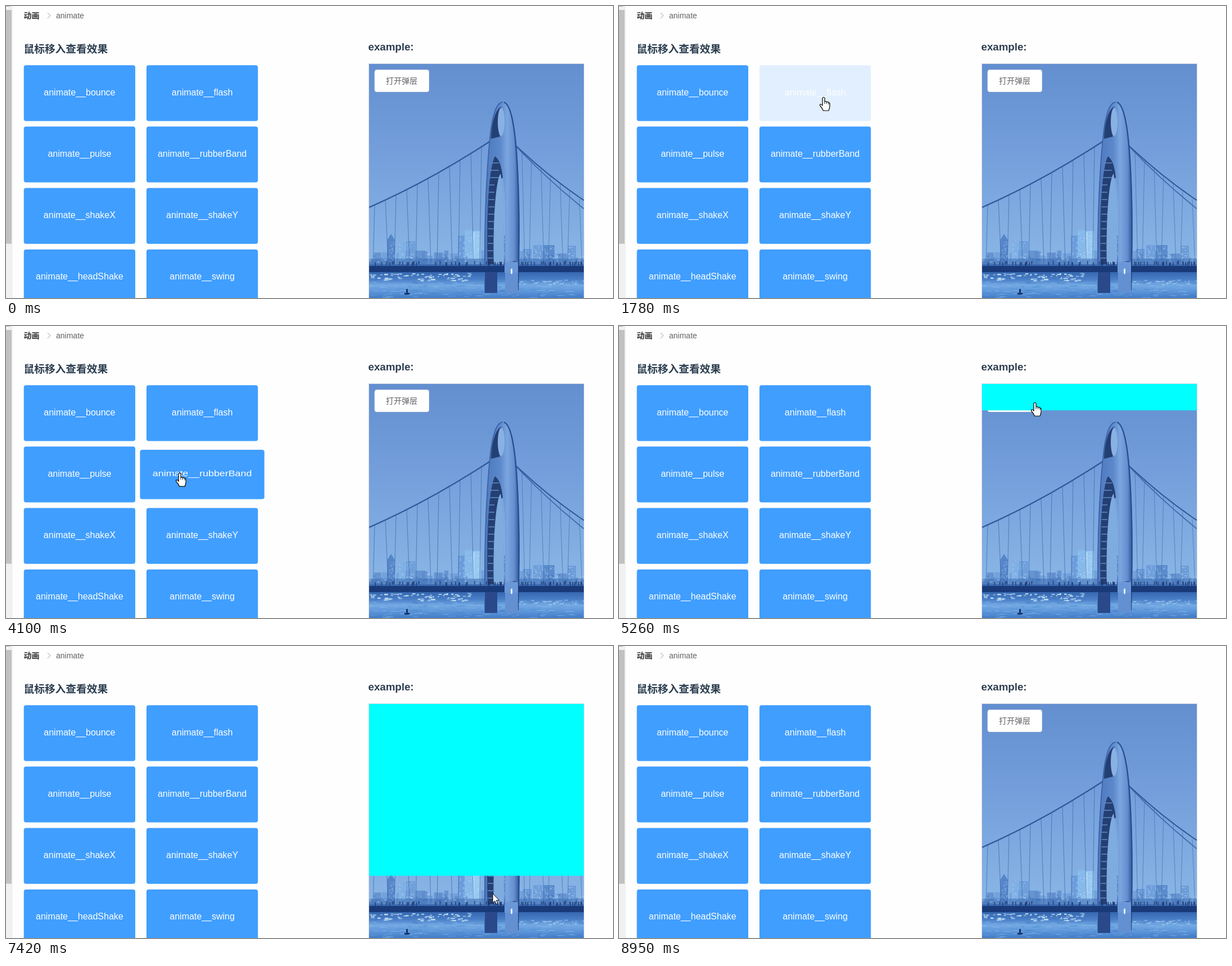
Animation of 1080x519 px, one loop 9960 ms. Source, as an HTML page:

```html
<!DOCTYPE html>
<html lang="zh">
<head>
<meta charset="utf-8">
<title>animate</title>
<style>
html, body { margin: 0; width: 100%; height: 100%; overflow: hidden; background: #fefefe; }
svg { display: block; width: 100vw; height: 100vh; }
text { font-family: "Liberation Sans", Arial, "Noto Sans CJK SC", "Noto Sans CJK", sans-serif; }
</style>
</head>
<body>
<svg id="stage" viewBox="0 0 1080 519">
  <defs>
    <linearGradient id="sky" x2="0" y2="1">
      <stop offset="0" stop-color="#638fd0"/>
      <stop offset=".45" stop-color="#749fdb"/>
      <stop offset="1" stop-color="#8ab6e6"/>
    </linearGradient>
    <linearGradient id="leg">
      <stop offset="0" stop-color="#4c78bd"/>
      <stop offset=".45" stop-color="#5c88cb"/>
      <stop offset=".65" stop-color="#7aa5de"/>
      <stop offset=".85" stop-color="#6590d0"/>
      <stop offset="1" stop-color="#2d559b"/>
    </linearGradient>
    <linearGradient id="water" x2="0" y2="1">
      <stop offset="0" stop-color="#3465ad"/>
      <stop offset=".3" stop-color="#4a80c8"/>
      <stop offset=".5" stop-color="#73a9e3"/>
      <stop offset=".72" stop-color="#5e97da"/>
      <stop offset="1" stop-color="#3f7ac6"/>
    </linearGradient>
    <clipPath id="frame"><rect x="646" y="103" width="382" height="416"/></clipPath>
  </defs>
  <rect width="1080" height="519" fill="#fefefe"/>
  <rect width="12" height="519" fill="#f1f1f1"/>
  <rect y="7" width="10" height="415.500" fill="#c1c1c1"/>
  <rect width="7" height="1" fill="#d9a28c"/>
  <text x="31.500" y="22" font-size="14" font-weight="700" fill="#303133">动画</text>
  <path d="M74 12l5 5l-5 5" fill="none" stroke="#c0c4cc" stroke-width="1.200"/>
  <text x="89" y="22" font-size="14" fill="#606266">animate</text>
  <g font-size="18.720" font-weight="700" fill="#2c3e50">
    <text x="31.500" y="82.500">鼠标移入查看效果</text>
    <text x="644.500" y="79">example:</text>
  </g>
  <g id="cards"></g>
  <rect x="645.500" y="102.500" width="383" height="430" fill="none" stroke="#d5dae4"/>
  <g clip-path="url(#frame)">
    <g id="photo"></g>
    <rect x="656" y="113.500" width="96.500" height="39" rx="3.500" fill="#fff" stroke="#dcdfe6"/>
    <text x="704" y="138" font-size="14" text-anchor="middle" fill="#606266">打开弹层</text>
    <rect id="layer" x="646" y="103" width="382" fill="#0ff"/>
    <g id="note">
      <text x="796.500" y="384" font-size="16" fill="#2c3e50">我是弹层</text>
      <circle cx="868.500" cy="378" r="6.800" fill="#2c3e50"/>
      <path d="M866 375.500l5 5m0-5l-5 5" stroke="#0ff" stroke-width="1.300"/>
    </g>
  </g>
  <g id="pointer" fill="#fff" stroke="#000" stroke-linejoin="round">
    <g id="hand">
      <path d="M-2 1.500Q0-1 2 1.500V8Q4 6.500 5.500 8.700Q8 7.500 9 10Q11 9.500 11 12V17Q10.500 20 9 24H-.5Q-2 20-6 15.500Q-7.500 13-5.500 12.500Q-3.500 12.500-2 15Z" stroke-width="1.200"/>
      <path d="M2 8V12M5.500 8.700V12M9 10V13" fill="none" stroke-width=".9"/>
    </g>
    <path id="arrow" d="M0 0V16.500L3.800 13L6.400 19L9 17.800L6.500 12H11.500Z"/>
  </g>
</svg>
<script>
const LOOP = 9960, STEP = 77.45, FIRST = 530;
const $ = id => document.getElementById(id);
const clamp = v => Math.max(0, Math.min(1, v));
const lerp = (a, b, k) => a + (b - a) * k;

function bezier(x1, y1, x2, y2) {
  const at = (a, b, u) => 3 * u * (1 - u) ** 2 * a + 3 * u * u * (1 - u) * b + u ** 3;
  return x => {
    let lo = 0, hi = 1;
    for (let i = 0; i < 24; i++) {
      const mid = (lo + hi) / 2;
      if (at(x1, x2, mid) < x) lo = mid; else hi = mid;
    }
    return at(y1, y2, lo);
  };
}
const ease = bezier(.25, .1, .25, 1);
const inOut = bezier(.42, 0, .58, 1);
const soft = bezier(.215, .61, .355, 1);
const steep = bezier(.755, .05, .855, .06);
const linear = k => k;

// Each key is [time, values, easing towards the next key].
function track(keys, t) {
  let i = keys.findIndex(k => k[0] > t);
  if (i < 0) i = keys.length;
  if (i === 0) return keys[0][1];
  const [start, from, curve = ease] = keys[i - 1];
  if (i === keys.length) return from;
  const k = curve((t - start) / (keys[i][0] - start));
  return from.map((v, n) => lerp(v, keys[i][1][n], k));
}

const flash = [[0, [1]], [.25, [0]], [.5, [1]], [.75, [0]], [1, [1]]];
const bounce = [
  [0, [0, 1], soft], [.2, [0, 1], soft], [.4, [-30, 1.1], steep], [.43, [-30, 1.1], steep],
  [.53, [0, 1], soft], [.7, [-15, 1.05], steep], [.8, [0, .95]], [.9, [-4, 1.02]], [1, [0, 1]]
];
const pulse = [[0, [1], inOut], [.5, [1.05], inOut], [1, [1]]];
const band = [
  [0, [1, 1]], [.3, [1.25, .75]], [.4, [.75, 1.25]], [.5, [1.15, .85]],
  [.65, [.95, 1.05]], [.75, [1.05, .95]], [1, [1, 1]]
];
const path = [
  [530, [992, 515], linear], [760, [760, 240], linear], [950, [520, 62], linear],
  [1134, [385, 130]], [1300, [364, 162]], [1950, [364, 162], inOut],
  [2110, [175, 163]], [3200, [175, 163], inOut], [3340, [152, 252]],
  [3880, [152, 252], inOut], [4010, [300, 262], linear], [4420, [345, 258], linear],
  [4540, [455, 225], linear], [4730, [740, 136]], [5980, [740, 136], linear],
  [6200, [895, 300], linear], [6350, [914, 385], linear], [6570, [866, 440]],
  [8560, [866, 440], linear], [8950, [997, 521]]
];

const names = ["bounce", "flash", "pulse", "rubberBand", "shakeX", "shakeY", "headShake", "swing"];
$("cards").innerHTML = names.map((name, i) => {
  const x = 31.7 + i % 2 * 218.2, y = 105.2 + Math.floor(i / 2) * 109.15;
  return `<g id="${name}"><rect x="${x}" y="${y}" width="198.3" height="99.2" rx="4" fill="#409eff"/>
    <text x="${x + 99.2}" y="${y + 53.5}" font-size="16" text-anchor="middle" fill="#fff">animate__${name}</text></g>`;
}).join("");

function drawPhoto() {
  let seed = 7;
  const rnd = () => (seed = seed * 16807 % 2147483647) / 2147483647;
  const out = [];
  const rect = (x, y, w, h, fill, alpha = 1) =>
    out.push(`<rect x="${x}" y="${y}" width="${w}" height="${h}" fill="${fill}" opacity="${alpha}"/>`);
  const line = (d, color, width, alpha = 1) =>
    out.push(`<path d="${d}" fill="none" stroke="${color}" stroke-width="${width}" opacity="${alpha}"/>`);
  const fill = (d, color) => out.push(`<path d="${d}" fill="${color}"/>`);

  rect(646, 103, 382, 360, "url(#sky)");

  // Skyline with lit windows
  for (let x = 646; x < 1028; x += 7 + rnd() * 9) {
    const h = 8 + rnd() * 19;
    rect(x, 460 - h, 7 + rnd() * 10, h, rnd() < .5 ? "#5b8acb" : "#6d9cd8", .75);
  }
  const towers = [
    [678, 416, 14, "#5686c9"], [698, 421, 13, "#7fb0e5"], [712, 418, 16, "#6f9fdb"],
    [804, 408, 14, "#6b9cda"], [816, 398, 14, "#86b9eb"], [830, 400, 15, "#98c8f1"],
    [880, 408, 9, "#5c8dcd"], [920, 432, 15, "#6797d5"], [938, 425, 16, "#6e9fda"],
    [956, 425, 20, "#5a8bcc"], [1000, 426, 14, "#6c9cd8"]
  ];
  for (const [x, y, w, color] of towers) {
    rect(x, y, w, 460 - y, color);
    for (let i = 0; i < w * 1.6; i++)
      rect(x + 1 + rnd() * (w - 3), y + 2 + rnd() * (455 - y), 2, 1.5, "#c4e5fa", .2 + rnd() * .4);
  }
  fill("M678 416L685 405L692 416Z", "#5686c9");
  line("M884.500 385V410", "#426fb4", 1.6);
  line("M832 402V458", "#d4effd", 1.5);
  rect(646, 449, 382, 11, "#3f6fb5", .55);
  for (let i = 0; i < 60; i++)
    rect(646 + rnd() * 380, 440 + rnd() * 17, 2 + rnd() * 3, 1.5, rnd() < .5 ? "#b5d9f6" : "#315fa8", .6);

  // Suspension cables and hangers
  const leftY = x => { const k = (x - 646) / 226; return 358 - 98 * k - 28 * k * k; };
  for (let i = 0; i < 11; i++) {
    const x = 656 + i * 19;
    line(`M${x} ${leftY(x)}L${x + (i % 2 ? 5 : -3)} 459`, "#456fb0", 1.1, .75);
  }
  for (let i = 0; i < 7; i++) {
    const x = 918 + i * 17;
    line(`M${x} ${250 + (x - 908) * .83}L${x + (i % 2 ? -4 : 5)} 459`, "#456fb0", 1, .7);
  }
  line("M646 358Q760 308 874 232", "#2f5698", 2.2);
  line("M907 248Q965 303 1029 346", "#2f5698", 2);
  line("M907 249Q965 310 1029 361", "#3c65a8", 1.6);

  // Dark bank, lights and water
  rect(646, 472, 382, 48, "url(#water)");
  for (let i = 0; i < 150; i++)
    rect(640 + rnd() * 385, 487 + rnd() * 31, 4 + rnd() * 13, 1, rnd() < .5 ? "#a9d2f4" : "#3971bc", .2 + rnd() * .35);
  for (let i = 0; i < 75; i++)
    rect(646 + rnd() * 180, 474 + rnd() * 14, 2 + rnd() * 6, 2, "#d2edfc", .4 + rnd() * .5);
  for (let i = 0; i < 25; i++)
    rect(912 + rnd() * 114, 486 + rnd() * 9, 2 + rnd() * 5, 1.5, "#bfe0f8", .6);

  // Tower
  fill("M851 510C850 400 854 300 861 228C865 192 872 170 883 170C898 170 905 205 909 255C914 325 915 410 911 510H888V350C887 310 880 267 870 267C862 290 860 390 872 510Z", "url(#leg)");
  fill("M863 236C864 205 872 181 882 179C874 192 874 220 879 232Z", "#243f72");
  out.push('<ellipse cx="881" cy="206" rx="6" ry="25" fill="#89b1e4"/>');
  fill("M857 459C855 380 858 290 870 267C877 271 882 285 884 305C872 310 867 370 868 459Z", "#253f72");
  fill("M868 459C866 375 872 307 880 298C885 325 886 390 886 459Z", "#7facdf");
  for (let y = 279; y < 455; y += 13)
    line(`M${860 - (y - 279) * .02} ${y}H${y < 310 ? 877 : 869}`, "#5d85c3", 1.8, .9);
  line("M852 460C851 350 858 240 866 202C871 178 877 171 884 171", "#365fa4", 1.5);
  line("M886 171C901 176 907 230 910 290C914 365 913 430 911 505", "#274c8f", 2.2);

  // Deck, people and piers
  rect(852, 472, 22, 38, "#29498a");
  rect(888, 472, 23, 38, "#6390d1");
  rect(646, 459, 382, 3, "#3c69b0");
  rect(646, 462, 382, 11, "#193a79");
  for (let i = 0; i < 75; i++)
    rect(646 + rnd() * 380, 453 + rnd() * 3, 1.6, 6, "#1c376e", .85);
  rect(887, 455, 24, 19, "#6a97d7");
  rect(898, 467, 3, 9, "#e2f3ff");
  fill("M708 510H719L717 513H710ZM712 510V503H715V510Z", "#14346e");
  $("photo").innerHTML = out.join("");
}

const about = (x, y, sx, sy, dy = 0) =>
  `translate(${x} ${y + dy}) scale(${sx} ${sy}) translate(${-x} ${-y})`;

// An effect runs for a second and is cut off when the pointer leaves.
const phase = (t, start, end) => t < end ? clamp((t - start) / 1000) : 0;

function drawCards(t) {
  $("flash").setAttribute("opacity", track(flash, phase(t, 1131, 2140))[0]);
  const [dy, stretch] = track(bounce, phase(t, 2108, 3200));
  $("bounce").setAttribute("transform", about(130.8, 204.4, 1, stretch, dy));
  const [size] = track(pulse, phase(t, 3335, 3970));
  $("pulse").setAttribute("transform", about(130.8, 264, size, size));
  const [sx, sy] = track(band, phase(t, 4010, 4540));
  $("rubberBand").setAttribute("transform", about(349, 264, sx, sy));
}

function drawLayer(t) {
  let bottom = 103, shift = -600;
  if (t >= 5015 && t < 6987) {
    const rest = 1 - soft(clamp((t - 5015) / 600));
    bottom = 653 - 2447 * rest;
    shift = -3025 * rest;
  } else if (t >= 6987) {
    const gone = 561 * (t - 6987) / 1000;
    bottom = 653 - gone;
    shift = -1.3 * gone;
  }
  $("layer").setAttribute("height", Math.max(0, bottom - 103));
  $("note").setAttribute("transform", `translate(0 ${Math.max(-600, shift)})`);
}

function drawPointer(t) {
  const [x, y] = track(path, t);
  const onCard = t >= 1134 && t < 4540;
  const onButton = t >= 4690 && t < 6000;
  $("pointer").setAttribute("transform", `translate(${x} ${y})`);
  $("pointer").style.display = t < FIRST || t >= 8950 ? "none" : "";
  $("hand").style.display = onCard || onButton ? "" : "none";
  $("arrow").style.display = onCard || onButton ? "none" : "";
}

function render(now) {
  const ms = now % LOOP;
  const t = ms < FIRST ? 0 : ms >= 8950 ? 8950 : FIRST + Math.floor((ms - FIRST + 12) / STEP) * STEP;
  drawCards(t);
  drawLayer(t);
  drawPointer(t);
}

drawPhoto();
const begin = performance.now();
function tick() {
  render(performance.now() - begin);
  requestAnimationFrame(tick);
}
tick();
</script>
</body>
</html>
```
